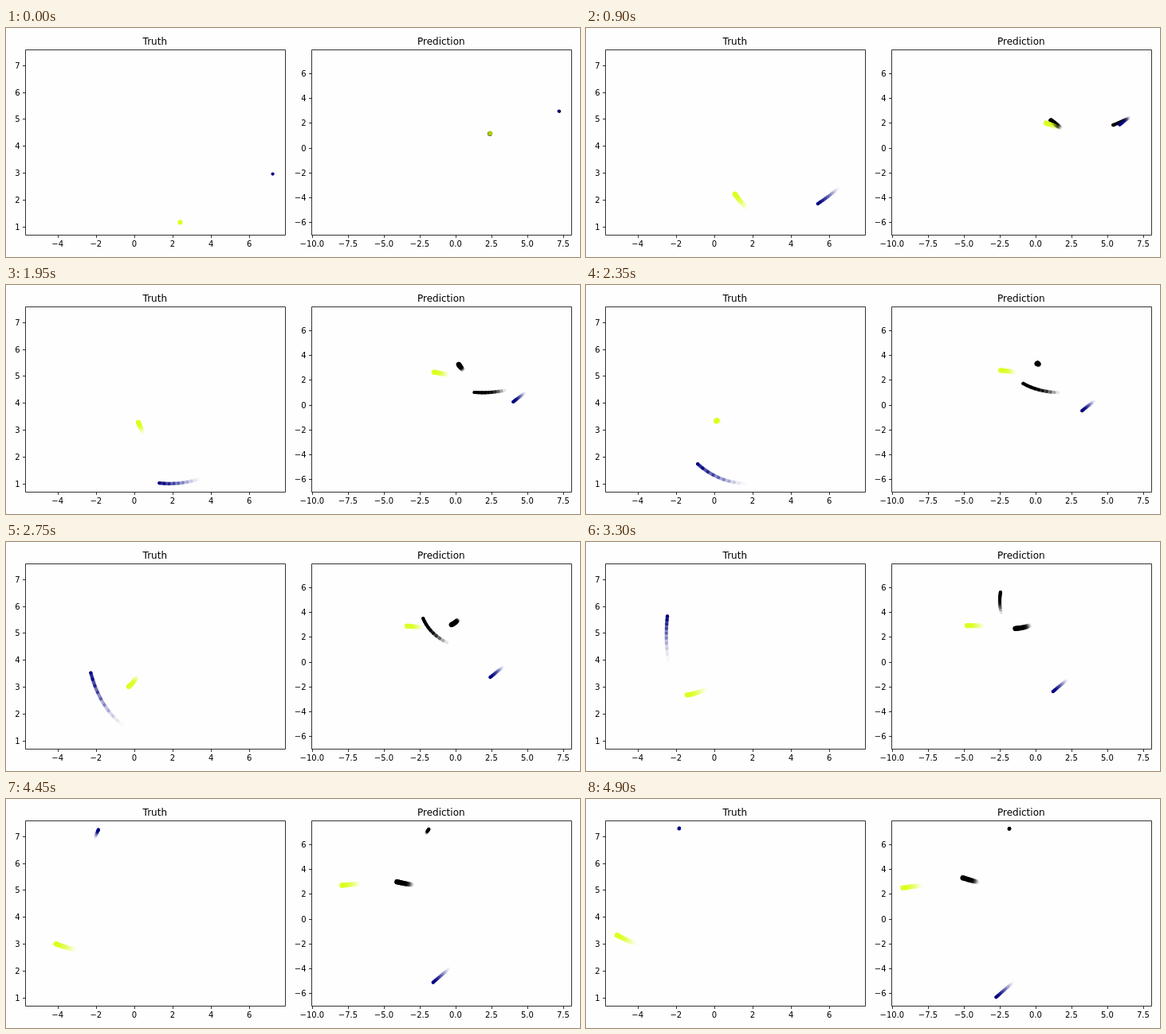
An HTML page with a canvas for the animation above (4.95 s loop, 720 by 288 pixels).

```html
<!DOCTYPE html>
<html lang="en">
<head>
<meta charset="utf-8">
<title>Truth and prediction</title>
<style>
  html, body { margin: 0; width: 720px; height: 288px; overflow: hidden; background: #fefefe; }
  canvas, svg { position: absolute; left: 0; top: 0; display: block; }
  text { font: 10px "DejaVu Sans", sans-serif; fill: #000; }
  .title { font-size: 12px; }
  path { fill: none; stroke: #000; stroke-width: 0.8; }
</style>
</head>
<body>
<canvas id="plot" width="720" height="288"></canvas>
<svg id="axes" width="720" height="288"></svg>
<script>
const STEP = 50, STEPS = 99, TRAIL = 10;
const TOP = 27.5, BOTTOM = 260.5;
const ctx = document.getElementById('plot').getContext('2d');

const range = (from, to, by) =>
  Array.from({ length: (to - from) / by + 1 }, (_, i) => from + i * by);

const left = {
  title: 'Truth', x0: 24.5, x1: 350.5, digits: 0,
  xs: range(-4, 6, 2), ys: range(1, 7, 1),
  px: v => 161.3 + 24.05 * v, py: v => 283.8 - 33.8 * v
};
const right = {
  title: 'Prediction', x0: 383.5, x1: 709.5, digits: 1,
  xs: range(-10, 7.5, 2.5), ys: range(-6, 6, 2),
  px: v => 564.3 + 18 * v, py: v => 151 - 15.57 * v
};

function axes(p) {
  const snap = v => Math.floor(v) + 0.5;
  const label = (v, d) => v.toFixed(d).replace('-', '\u2212');
  const text = (x, y, s, anchor, cls = '') =>
    `<text x="${x}" y="${y}" text-anchor="${anchor}" class="${cls}">${s}</text>`;
  let d = `M${p.x0} ${TOP}H${p.x1}V${BOTTOM}H${p.x0}Z`;
  let out = text((p.x0 + p.x1) / 2 - 0.7, 21, p.title, 'middle', 'title');
  for (const v of p.xs) {
    d += `M${snap(p.px(v))} ${BOTTOM}v3.5`;
    out += text(p.px(v) - 0.4, 275, label(v, p.digits), 'middle');
  }
  for (const v of p.ys) {
    d += `M${p.x0} ${snap(p.py(v))}h-3.5`;
    out += text(p.x0 - 7, Math.round(p.py(v) + 3.6), label(v, 0), 'end');
  }
  return `<path d="${d}"/>${out}`;
}
document.getElementById('axes').innerHTML = axes(left) + axes(right);

// Truth: two bodies on a Kepler orbit about a drifting centre of mass
const orbit = { size: 3.56, ecc: 0.4917, rate: 0.0506, nearest: 49.5, tilt: -145 * Math.PI / 180 };
const SHARE = 0.255;

function separation(t) {
  const { size, ecc, rate, nearest, tilt } = orbit;
  const mean = rate * (t - nearest);
  let E = mean + ecc * Math.sin(mean);
  for (let i = 0; i < 8; i++) {
    E -= (E - ecc * Math.sin(E) - mean) / (1 - ecc * Math.cos(E));
  }
  const r = size * (1 - ecc * Math.cos(E));
  const angle = tilt - 2 * Math.atan(Math.sqrt((1 + ecc) / (1 - ecc)) * Math.tan(E / 2));
  return [r * Math.cos(angle), r * Math.sin(angle)];
}
const truth = k => t => {
  const [x, y] = separation(t);
  return [3.609 - 0.0803 * t + k * x, 1.625 + 0.0277 * t + k * y];
};
const truthLight = truth(1 - SHARE);
const truthHeavy = truth(-SHARE);

// Prediction: constant acceleration
const guessLight = t => [
  7.178 - 0.0683 * t - 0.000339 * t * t,
  2.987 - 0.0533 * t - 0.000424 * t * t
];
const guessHeavy = t => [
  2.394 - 0.0882 * t - 0.000314 * t * t,
  1.188 + 0.0538 * t - 0.000411 * t * t
];

const NAVY = '#000080', LIME = '#dcff20', BLACK = '#000';
const THIN = 4.2, THICK = 6.2;
const fade = u => u ** 1.6;
const dense = u => 1 - (1 - fade(u)) ** 4;

const bodies = [
  { panel: left, path: truthLight, width: THIN, color: NAVY, head: 1, alpha: fade },
  { panel: left, path: truthHeavy, width: THICK, color: LIME, head: 1, alpha: fade },
  { panel: right, path: truthLight, width: THIN, color: BLACK, head: 1, alpha: dense },
  { panel: right, path: truthHeavy, width: THICK, color: BLACK, head: 1, alpha: dense },
  { panel: right, path: guessLight, width: THIN, color: NAVY, head: 0.8, alpha: fade },
  { panel: right, path: guessHeavy, width: THICK, color: LIME, head: 0.8, alpha: fade }
];

// A round-capped stroke for each past step, fainter with age, then the head
function drawBody({ panel, path, width, color, head, alpha }, step) {
  const at = t => {
    const [x, y] = path(t);
    return [panel.px(x), panel.py(y)];
  };
  ctx.strokeStyle = ctx.fillStyle = color;
  ctx.lineWidth = width;
  ctx.lineCap = 'round';
  for (let age = Math.min(TRAIL - 1, step); age > 0; age--) {
    ctx.globalAlpha = alpha(1 - age / TRAIL);
    ctx.beginPath();
    ctx.moveTo(...at(step - age));
    ctx.lineTo(...at(step - age + 1));
    ctx.stroke();
  }
  ctx.globalAlpha = head;
  ctx.beginPath();
  ctx.arc(...at(step), width / 2, 0, 2 * Math.PI);
  ctx.fill();
}

const start = performance.now();
let shown = -1;
function tick() {
  const step = Math.floor((performance.now() - start) / STEP) % STEPS;
  if (step !== shown) {
    shown = step;
    ctx.clearRect(0, 0, 720, 288);
    for (const b of bodies) drawBody(b, step);
  }
  requestAnimationFrame(tick);
}
tick();
</script>
</body>
</html>
```
